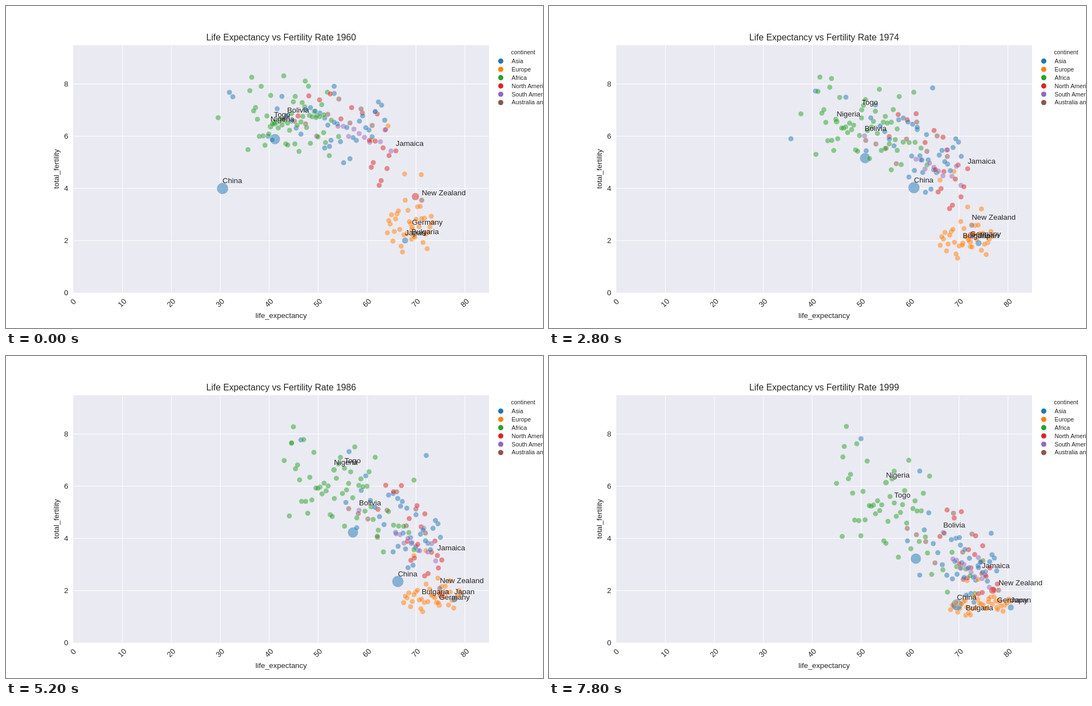
These frames come from a looping animation (966 by 580 pixels, 8000 ms). An HTML page:

```html
<!DOCTYPE html>
<html lang="en">
<head>
<meta charset="utf-8">
<title>Life Expectancy vs Fertility Rate</title>
<style>
html, body { margin: 0; width: 100%; height: 100%; overflow: hidden; background: #fff; }
svg { display: block; }
text { font: 13.43px "Liberation Sans", Arial, sans-serif; fill: #262626; }
.title { font-size: 16.11px; }
.legend text { font-size: 10.74px; }
.mid { text-anchor: middle; }
.end { text-anchor: end; }
</style>
</head>
<body>
<svg id="stage" width="966" height="580" viewBox="0 0 966 580"></svg>
<script>
const FIRST = 1960, LAST = 1999, STEP = 200;
const COLORS = {
  Asia: '#1f77b4', Europe: '#ff7f0e', Africa: '#2ca02c',
  'North America': '#d62728', 'South America': '#9467bd', 'Australia and Oceania': '#8c564b'
};
const [ASIA, EUROPE, AFRICA, NORTH, SOUTH, OCEANIA] = Object.values(COLORS);
const stage = document.getElementById('stage');
const px = life => 121 + life * 8.805;
const py = fert => 516.5 - fert * 47.06;
const mix = (a, b, f) => a + (b - a) * f;

function add(tag, attrs, parent = stage, text) {
  const el = document.createElementNS('http://www.w3.org/2000/svg', tag);
  for (const k in attrs) el.setAttribute(k, attrs[k]);
  if (text !== undefined) el.textContent = text;
  parent.appendChild(el);
  return el;
}

// Static chart
add('rect', { x: 121, y: 70.5, width: 748, height: 446, fill: '#eaeaf2' });
const grid = add('g', { stroke: '#fff', 'stroke-width': 1 });
for (let v = 0; v <= 80; v += 10) {
  const x = px(v);
  if (v) add('path', { d: `M${Math.round(x) + 0.5} 70.5V516.5` }, grid);
  add('text', { class: 'mid', y: 4.8, transform: `translate(${x - 0.3} ${v ? 534.5 : 532.5}) rotate(-45)` }, stage, v);
}
for (let v = 0; v <= 8; v += 2) {
  const y = py(v);
  if (v) add('path', { d: `M121 ${Math.round(y) + 0.5}H869` }, grid);
  add('text', { class: 'end', x: 112, y: y + 4.8 }, stage, v);
}
add('text', { class: 'mid', x: 495, y: 561.5 }, stage, 'life_expectancy');
add('text', { class: 'mid', transform: 'translate(94.5 293.5) rotate(-90)' }, stage, 'total_fertility');
const title = add('text', { class: 'title mid', x: 495, y: 62 });

const legend = add('g', { class: 'legend' });
add('text', { x: 908.5, y: 87.2 }, legend, 'continent');
Object.entries(COLORS).forEach(([name, fill], i) => {
  const y = 99.2 + i * 14.93;
  add('circle', { cx: 890, cy: y, r: 4.7, fill }, legend);
  add('text', { x: 909.5, y: y + 3.6 }, legend, name);
});

let seed = 1960;
function random() {
  seed = seed + 0x6D2B79F5 | 0;
  let t = Math.imul(seed ^ seed >>> 15, 1 | seed);
  t = t + Math.imul(t ^ t >>> 7, 61 | t) ^ t;
  return ((t ^ t >>> 14) >>> 0) / 4294967296;
}
const bell = () => (random() + random() - 1) * 2.45;

const dots = [];
const addDot = dot => dots.push({ r: 4.8, z: random(), ...dot });

// Labelled and large countries: [life, fertility] at four years
const KEY_YEARS = [FIRST, 1967, 1982, LAST];
function country(name, fill, r, ...keys) {
  const place = year => {
    const i = year < KEY_YEARS[1] ? 0 : year < KEY_YEARS[2] ? 1 : 2;
    const f = (year - KEY_YEARS[i]) / (KEY_YEARS[i + 1] - KEY_YEARS[i]);
    return keys[i].map((v, j) => mix(v, keys[i + 1][j], f));
  };
  addDot({ name, fill, r, place });
}

// Life rises fast, then slows; a higher lag delays the fall in fertility.
// A crisis briefly cuts life expectancy by its depth.
function drift(fill, lag, from, to, crisis) {
  const place = year => {
    const p = (year - FIRST) / (LAST - FIRST);
    let life = mix(from[0], to[0], 1 - (1 - p) ** 1.5);
    if (crisis) life -= crisis.depth * Math.exp(-(((year - crisis.year) / crisis.width) ** 2));
    return [life, mix(from[1], to[1], p ** lag)];
  };
  addDot({ fill, place });
}

// Group ends are [life, fertility, life spread, fertility spread];
// tilt ties fertility to life at the end
function crowd(fill, count, lag, from, to, tilt = -0.06) {
  for (let i = 0; i < count; i++) {
    const u = ((2 * i + 1) / count - 1) * 1.7, v = bell();
    const spot = ([x, y, sx, sy], slope) => [x + u * sx, y + v * sy + slope * u * sx];
    drift(fill, lag, spot(from, 0), spot(to, tilt));
  }
}

country('China', ASIA, 10.4, [30.5, 3.99], [56.9, 5.25], [65.3, 2.62], [69.6, 1.45]);
country('Jamaica', NORTH, 4.8, [65.9, 5.43], [69.6, 5.79], [74.3, 3.55], [74.7, 2.65]);
country('New Zealand', OCEANIA, 4.8, [71.2, 3.54], [71.5, 3.01], [73.9, 2.1], [78.1, 2.01]);
country('Germany', EUROPE, 5.3, [69.2, 2.41], [71, 2.37], [73.8, 1.47], [77.8, 1.35]);
country('Japan', ASIA, 5.7, [67.8, 2], [71.4, 2.02], [77, 1.76], [80.6, 1.35]);
country('Bulgaria', EUROPE, 4.8, [69.1, 2.05], [70.5, 1.94], [71.1, 1.85], [71.4, 1.05]);
country('Bolivia', SOUTH, 4.8, [43.7, 6.7], [46.3, 6.59], [55.8, 5.33], [66.8, 4.22]);
country('Togo', AFRICA, 4.8, [41, 6.53], [45.9, 6.92], [55, 7.09], [56.8, 5.35]);
country('Nigeria', AFRICA, 5.3, [40.3, 6.36], [38.3, 6.36], [52.7, 6.77], [55.1, 6.13]);
country('', ASIA, 9.5, [41.2, 5.88], [46.4, 5.7], [55.9, 4.53], [61.2, 3.22]);
country('', NORTH, 6.8, [69.9, 3.68], [70.8, 2.56], [74.6, 1.79], [76.9, 2.01]);

drift(ASIA, 1, [31.9, 7.67], [50, 7.81]);
drift(ASIA, 4, [32.6, 7.5], [62, 6.57]);
drift(ASIA, 4, [53.3, 7.9], [76.6, 4.19]);
drift(ASIA, 3, [39.8, 5.99], [59.5, 3.9], { year: 1977, depth: 33, width: 3.2 });
drift(AFRICA, 3, [43, 8.3], [45, 6.1], { year: 1994, depth: 32, width: 0.6 });
drift(AFRICA, 1, [29.6, 6.7], [46.3, 7.11]);
drift(AFRICA, 2.4, [47.4, 8.1], [74.9, 3.14]);

crowd(AFRICA, 44, 2, [44, 6.7, 5, 0.65], [55.3, 5.4, 5.5, 1]);
crowd(AFRICA, 8, 1.3, [49, 6.7, 3.5, 0.5], [70, 2.8, 2.2, 0.5]);
crowd(ASIA, 14, 2, [47, 6.7, 4, 0.5], [68, 3.5, 3.8, 0.75]);
crowd(ASIA, 20, 1, [57.5, 6.2, 3.8, 0.75], [73.2, 2.7, 2.8, 0.6]);
crowd(EUROPE, 34, 0.75, [68.8, 2.7, 2.8, 0.5], [74.4, 1.5, 3.7, 0.18], 0.015);
crowd(EUROPE, 4, 0.8, [66, 5, 4, 0.6], [75, 1.9, 2.6, 0.2]);
crowd(NORTH, 7, 1.2, [52.5, 6.9, 4.5, 0.35], [70.5, 4, 3, 0.5]);
crowd(NORTH, 11, 0.9, [62.5, 5.1, 1.3, 0.75], [74, 2.4, 2.5, 0.4]);
crowd(SOUTH, 11, 0.9, [59.5, 6.1, 3.5, 0.6], [72.5, 2.8, 2.4, 0.4]);
crowd(OCEANIA, 9, 1, [52, 6.7, 6, 0.4], [67, 4, 5, 0.6]);

const dotLayer = add('g', { 'fill-opacity': 0.5, stroke: '#fff', 'stroke-opacity': 0.5, 'stroke-width': 0.7 });
const textLayer = add('g', {});
dots.sort((a, b) => a.z - b.z);
for (const d of dots) {
  d.el = add('circle', { r: d.r, fill: d.fill }, dotLayer);
  if (d.name) d.label = add('text', {}, textLayer, d.name);
}

function draw(year) {
  title.textContent = `Life Expectancy vs Fertility Rate ${year}`;
  for (const d of dots) {
    const [life, fert] = d.place(year), x = px(life), y = py(fert);
    d.el.setAttribute('cx', x.toFixed(2));
    d.el.setAttribute('cy', y.toFixed(2));
    if (d.label) {
      d.label.setAttribute('x', x.toFixed(2));
      d.label.setAttribute('y', (y - 9.4).toFixed(2));
    }
  }
}

const start = performance.now();
let shown = 0;
function tick() {
  const step = Math.floor((performance.now() - start) / STEP);
  const year = FIRST + step % (LAST - FIRST + 1);
  if (year !== shown) draw(shown = year);
  requestAnimationFrame(tick);
}
tick();
</script>
</body>
</html>
```
